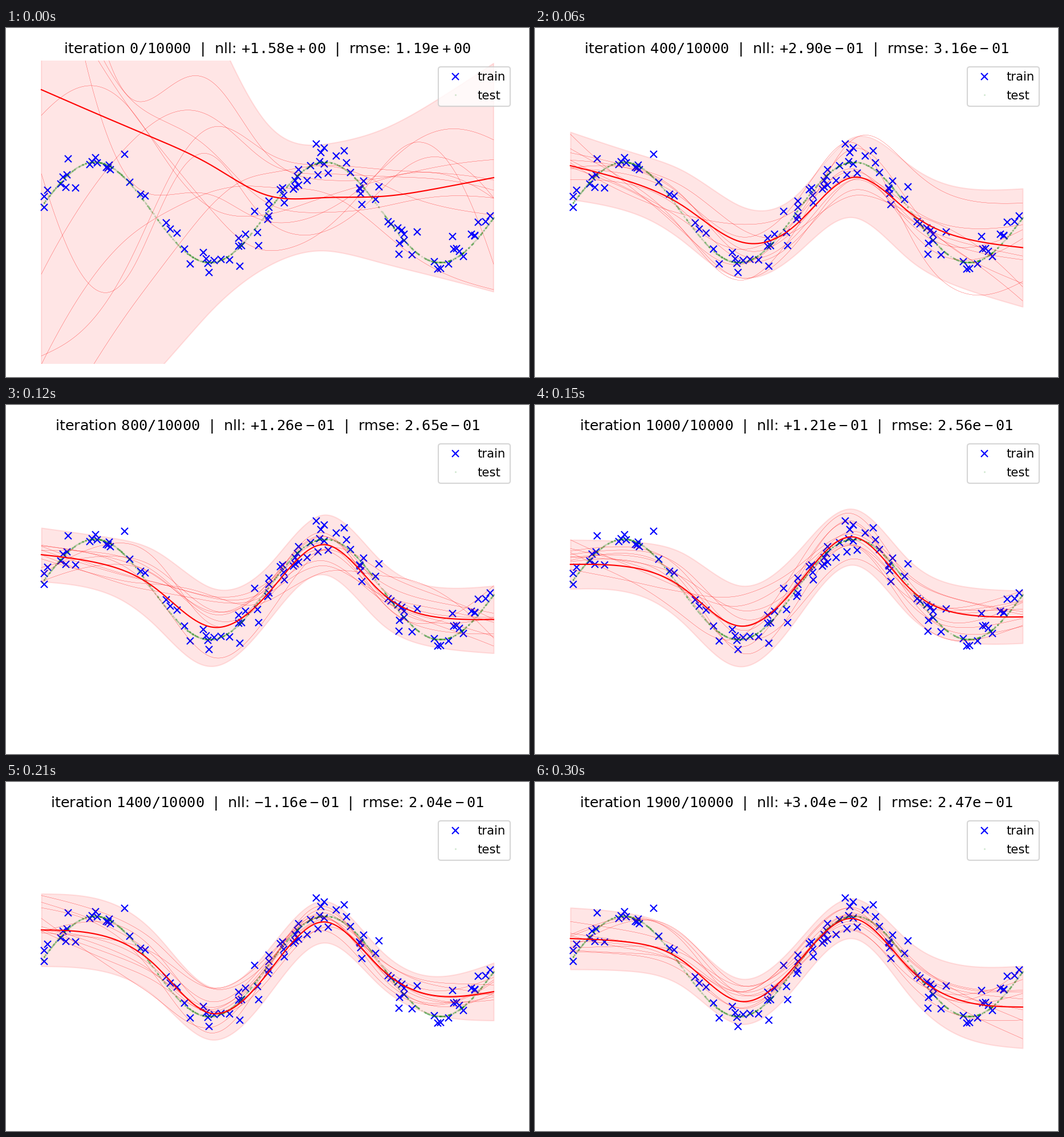
Write a matplotlib script that moves like this. It is 917 px wide and 611 px high and loops after 1330 ms.

```python
import numpy as np
import matplotlib.pyplot as plt
from matplotlib.animation import FuncAnimation

W, H, DPI = 917, 611, 152.8
X0, X1, TOP, BOTTOM = 62, 855, 57, 588
STEP_MS, LOOP_MS, TICK = 30, 1330, 10
LAST = 10
X = np.linspace(X0, X1, 300)


def spline(ys, x=X):
    """Natural cubic spline through values evenly spaced over the range."""
    ys = np.asarray(ys, float)
    n = len(ys)
    a, b = np.eye(n), np.zeros(n)
    for i in range(1, n - 1):
        a[i, i - 1:i + 2] = 1, 4, 1
        b[i] = 6 * (ys[i - 1] - 2 * ys[i] + ys[i + 1])
    m = np.linalg.solve(a, b)
    u = (x - X0) / (X1 - X0) * (n - 1)
    k = np.clip(u.astype(int), 0, n - 2)
    r = u - k
    l = 1 - r
    return (l * ys[k] + r * ys[k + 1]
            + ((l**3 - l) * m[k] + (r**3 - r) * m[k + 1]) / 6)


def draws(mean, half, seed, count=10):
    """Smooth random functions; the band is two standard deviations wide."""
    rng = np.random.default_rng(seed)
    z = np.clip(rng.normal(0, 0.5, (count, 6)), -1, 1)
    return [mean + half * spline(row) for row in z]


# step: (nll, rmse, key heights of the mean, key half-widths of the band)
KEYS = {
    0: (1.58, 1.19, [108, 151, 193, 240, 293, 297, 295, 281, 262],
        [715, 515, 310, 125, 98, 141, 200]),
    1: (0.449, 0.357, [237, 265, 306, 358, 342, 265, 313, 362, 389],
        [67, 53, 58, 64, 92, 115, 135]),
    3: (0.131, 0.274, [245, 270, 318, 390, 345, 258, 333, 376, 380],
        [51, 55, 74, 39, 62, 56, 72]),
    5: (0.121, 0.256, [279, 283, 321, 387, 317, 231, 321, 367, 371],
        [43, 48, 71, 58, 48, 49, 46]),
    6: (-0.019, 0.213, [258, 270, 321, 403, 332, 249, 330, 376, 364],
        [77, 67, 52, 58, 52, 36, 63]),
    8: (-0.213, 0.195, [260, 264, 318, 407, 338, 241, 322, 373, 370],
        [50, 55, 46, 22, 18, 27, 38]),
    10: (0.0304, 0.247, [274, 280, 314, 384, 319, 239, 327, 385, 394],
         [54, 49, 41, 37, 37, 59, 72]),
}


def state(step):
    if step in KEYS:
        nll, rmse, mean, half = KEYS[step]
    else:
        pairs = zip(KEYS[step - 1], KEYS[step + 1])
        nll, rmse, mean, half = [np.mean(p, axis=0) for p in pairs]
    mean, half = spline(mean), spline(half)
    count = min(200 * step, 1900)
    title = (rf"iteration $\mathtt{{{count}/10000}}$  |  "
             rf"nll: $\mathtt{{{nll:+.2e}}}$  |  "
             rf"rmse: $\mathtt{{{rmse:.2e}}}$")
    return title, mean, half, draws(mean, half, step)


states = [state(step) for step in range(LAST + 1)]


def wave(x):
    return 322.5 - 88 * np.cos(2 * np.pi * (x - 155.5) / 403.5)


rng = np.random.RandomState(1234)
rng.rand(6)
train_x = X0 + (X1 - X0) * rng.rand(100)
test_x = X0 + (X1 - X0) * rng.rand(1000)
train_y = wave(train_x) + 17 * rng.randn(100)

fig = plt.figure(figsize=((W + .001) / DPI, (H + .001) / DPI), dpi=DPI)
margin = 0.05 * (X1 - X0)
left, width = X0 - margin, X1 - X0 + 2 * margin
ax = fig.add_axes([left / W, 1 - BOTTOM / H, width / W, (BOTTOM - TOP) / H])
ax.set(xlim=(left, left + width), ylim=(BOTTOM, TOP))
ax.axis("off")

ax.plot(train_x, train_y, "x", color="blue", ms=6, label="train")
ax.plot(test_x, wave(test_x), ".", color="green", ms=1, alpha=0.17,
        label="test")
band = ax.fill_between(X, X, X, color="red", alpha=0.1)
samples = [ax.plot([], [], color="red", lw=0.14)[0] for _ in range(10)]
mean_line, = ax.plot([], [], color="red", lw=1)
ax.legend(loc="upper right", labelspacing=0.6)
title = ax.set_title("", fontsize=12)


def update(i):
    text, mean, half, curves = states[min(i * TICK // STEP_MS, LAST)]
    outline = np.r_[np.c_[X, mean - half], np.c_[X, mean + half][::-1]]
    band.set_verts([outline])
    mean_line.set_data(X, mean)
    for line, y in zip(samples, curves):
        line.set_data(X, y)
    title.set_text(text)
    return [band, mean_line, title, *samples]


anim = FuncAnimation(fig, update, frames=LOOP_MS // TICK, interval=TICK,
                     repeat=True, repeat_delay=0, blit=False)
plt.show()
```
